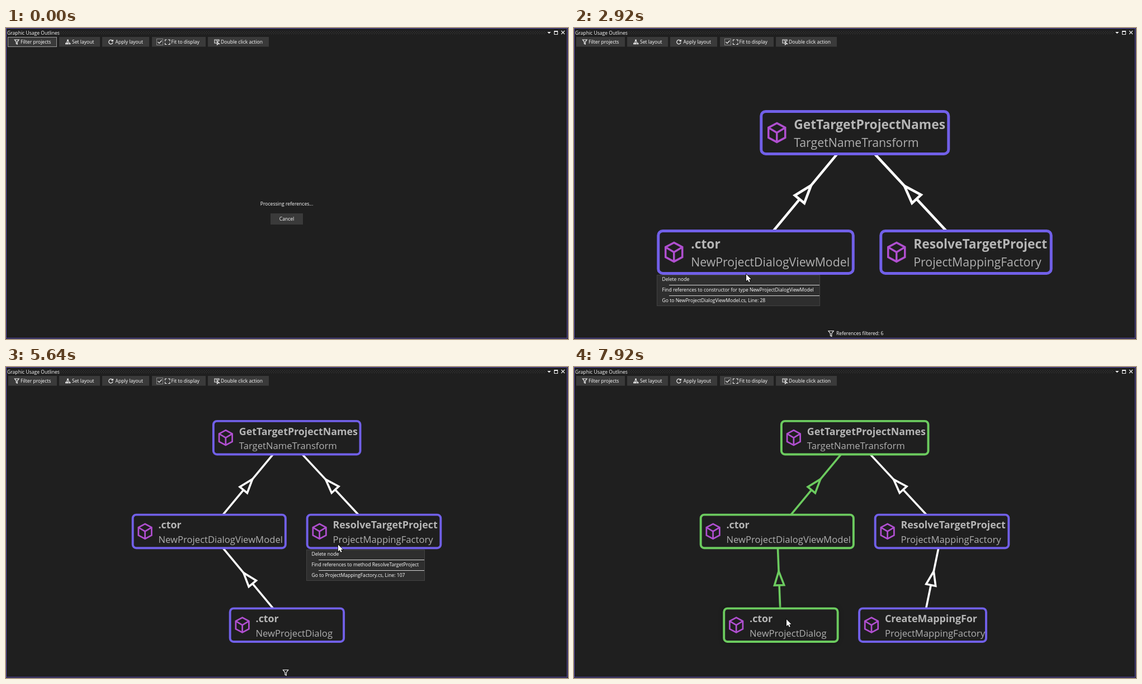
Animation, 1005 px wide and 557 px high, one loop 7.99 s. Source, as an HTML page with a canvas:

```html
<!DOCTYPE html>
<html lang="en">
<head>
<meta charset="utf-8">
<title>Reference graph</title>
<style>
html, body { margin: 0; width: 100%; height: 100%; overflow: hidden; background: #1f1f1f; }
canvas { display: block; }
</style>
</head>
<body>
<canvas id="stage" width="1005" height="557"></canvas>
<script>
const ctx = document.getElementById('stage').getContext('2d');
const LOOP = 7990, BG = '#1f1f1f', PURPLE = '#7160e8', GREEN = '#6ccb5f';
const FONT = '"Open Sans", "Noto Sans", sans-serif';
const NODE_H = 81, ROW = 214;

// Moments of the story, in ms
const T = { graph: 70, menu1: 2480, pick1: 3488, menu2: 5600, pick2: 5980, grow2: 6150 };

const lerp = (a, b, p) => a + (b - a) * p;
const clamp = v => Math.min(1, Math.max(0, v));
const ease = (t, start, length, power) => 1 - (1 - clamp((t - start) / length)) ** power;

// time, x, y
const cursorKeys = [
  [1040, 829, 72], [1810, 88, 416], [1880, 100, 415], [2410, 308, 400], [2850, 308, 400],
  [2920, 308, 441], [3060, 308, 452], [3250, 308, 461], [3510, 308, 461], [4260, 303, 465],
  [5090, 276, 440], [5560, 594, 318], [5640, 594, 318], [5860, 575, 355],
  [7290, 575, 355], [7800, 380, 452]
];

function cursorAt(t) {
  if (t < cursorKeys[0][0]) return null;
  const i = cursorKeys.findIndex(k => k[0] > t);
  if (i < 0) return cursorKeys.at(-1).slice(1);
  const [t0, x0, y0] = cursorKeys[i - 1], [t1, x1, y1] = cursorKeys[i];
  const p = (t - t0) / (t1 - t0);
  return [lerp(x0, x1, p), lerp(y0, y1, p)];
}

function text(str, x, y, size = 8.6, color = '#fff', weight = 400, align = 'left') {
  ctx.font = `${weight} ${size}px ${FONT}`;
  ctx.textAlign = align;
  ctx.fillStyle = color;
  ctx.fillText(str, x, y);
}

function rect(x, y, w, h, color) {
  ctx.fillStyle = color;
  ctx.fillRect(x, y, w, h);
}

function frame(x, y, w, h, color) {
  ctx.strokeStyle = color;
  ctx.lineWidth = 1;
  ctx.strokeRect(x + .5, y + .5, w - 1, h - 1);
}

function line(path, color = '#f0f0f0', width = 1, x = 0, y = 0) {
  ctx.save();
  ctx.translate(x, y);
  ctx.strokeStyle = color;
  ctx.lineWidth = width;
  ctx.stroke(new Path2D(path));
  ctx.restore();
}

function funnel(x, y, s) {
  line(`M0 0H${8 * s}L${5 * s} ${4 * s}V${8.5 * s}L${3 * s} ${7.5 * s}V${4 * s}Z`, '#f0f0f0', 1.2, x, y);
}

function drawToolbar(focused) {
  const buttons = [
    ['Filter projects', 4, 87, 26], ['Set layout', 95, 73, 118], ['Apply layout', 172, 84, 195.5],
    ['Fit to display', 261, 96, 295.5], ['Double click action', 361, 109, 384]
  ];
  for (const [label, x, w, tx] of buttons) {
    rect(x, 16, w, 17.5, '#3a3a3a');
    text(label, tx, 28);
  }
  if (focused) frame(3, 16, 88, 18, '#999');

  funnel(15.5, 21, .95);
  line('M4 2L1.5 7M5 2L7.5 7M4.5 4V7', '#f0f0f0', 1, 106, 20.5);
  for (const [x, y] of [[110.5, 22], [107.5, 28], [110.5, 28], [114, 28]]) rect(x - 1.3, y - 1.3, 2.6, 2.6, '#f0f0f0');
  line('M7.5 2.5A3.7 3.7 0 1 0 8 5.5M8.3 .5V3.2H5.5', '#f0f0f0', 1.2, 183, 20.5);
  frame(269, 19, 12, 12, '#858585');
  line('M2.5 6L5 8.5L9.5 3.5', '#f0f0f0', 1.2, 269, 19);
  line('M0 3V0H3M5.5 0H8.5V3M8.5 5.5V8.5H5.5M3 8.5H0V5.5', '#f0f0f0', 1.1, 284.5, 21);
  line('M4 6H0V0H8V3M2 2H6V4M4.5 4V9L6 7.5H8.5Z', '#f0f0f0', 1.1, 373, 21);
}

function drawWindow(focused) {
  rect(0, 0, 1005, 557, BG);
  text('Graphic Usage Outlines', 2, 11.5);
  ctx.fillStyle = '#484848';
  for (let x = 94; x < 963; x += 4) {
    ctx.fillRect(x, 6, 1, 1);
    ctx.fillRect(x + 2, 8, 1, 1);
    ctx.fillRect(x, 10, 1, 1);
  }
  ctx.fillStyle = '#f0f0f0';
  ctx.fill(new Path2D('M968 7H974.5L971.2 10.2Z'));
  frame(980, 5, 7, 7, '#f0f0f0');
  rect(980, 5, 7, 2, '#f0f0f0');
  line('M993 5L999 11M999 5L993 11', '#f0f0f0', 1.2);
  drawToolbar(focused);
  frame(0, 0, 1004, 556, '#5c4fb5');
}

// Nodes in world units: x is relative to the middle of the root
function layout(t) {
  const first = ease(t, T.graph, 700, 2.15);
  const second = ease(t, T.pick1, 840, 1.27);
  const third = ease(t, T.grow2, 840, 1.27);
  const node = (title, type, w, x, y, parent) => ({ title, type, w, x, y, parent });

  const root = node('GetTargetProjectNames', 'TargetNameTransform', 340, -170, 0);
  const model = node('.ctor', 'NewProjectDialogViewModel', 353.5, lerp(-170, -354, first), ROW * first, root);
  const resolve = node('ResolveTargetProject', 'ProjectMappingFactory', 309.5, lerp(-170, 44, first), ROW * first, root);
  const nodes = [root, model, resolve];
  if (t >= T.pick1) {
    const x = lerp(lerp(-354, -132, second), -301, third);
    nodes.push(node('.ctor', 'NewProjectDialog', 264.5, x, ROW * (1 + second), model));
  }
  if (t >= T.grow2) {
    nodes.push(node('CreateMappingFor', 'ProjectMappingFactory', 294.5, lerp(44, 7.5, third), ROW * (1 + third), resolve));
  }
  return { nodes, rest: 1 - first };
}

// Fit the bounds of all nodes to the view; rest is the part of the opening still to run
function fitView({ nodes, rest }) {
  const left = Math.min(...nodes.map(n => n.x)), right = Math.max(...nodes.map(n => n.x + n.w));
  const bottom = Math.max(...nodes.map(n => n.y)) + NODE_H;
  const s = Math.min(707.5 / (right - left), 399 / bottom) * (1 - .32 * Math.sqrt(rest));
  return {
    s,
    x: 502 + 39.5 * Math.sqrt(rest) - s * (left + right) / 2,
    y: 294.4 - 175 * rest ** .8 - s * bottom / 2
  };
}

function drawEdge(child, color) {
  const p = child.parent;
  const ax = child.x + child.w / 2, ay = child.y + NODE_H / 2;
  const bx = p.x + p.w / 2, by = p.y + NODE_H / 2;
  if (ay - by < 1) return;
  const midY = (p.y + NODE_H + child.y) / 2;
  const midX = lerp(bx, ax, (midY - by) / (ay - by));
  ctx.strokeStyle = color;
  ctx.lineWidth = 4.6;
  ctx.beginPath();
  ctx.moveTo(ax, ay);
  ctx.lineTo(bx, by);
  ctx.stroke();

  ctx.save();
  ctx.translate(midX, midY);
  ctx.rotate(Math.atan2(by - ay, bx - ax));
  ctx.fillStyle = BG;
  const head = new Path2D('M16 0L-16 -11V11Z');
  ctx.fill(head);
  ctx.stroke(head);
  ctx.restore();
}

function drawNode(n, color, hovered) {
  ctx.save();
  ctx.translate(n.x, n.y);
  ctx.beginPath();
  ctx.roundRect(2.5, 2.5, n.w - 5, NODE_H - 5, 8);
  ctx.fillStyle = BG;
  if (hovered) {
    ctx.shadowColor = 'rgba(0,0,0,.6)';
    ctx.shadowBlur = 9;
  }
  ctx.fill();
  ctx.shadowBlur = 0;
  ctx.strokeStyle = color;
  ctx.lineWidth = 5;
  ctx.stroke();
  line('M0 -17L15 -9V9L0 17L-15 9V-9ZM-15 -9L0 0L15 -9M0 0V17', '#b04fd0', 3.5, 30.5, 40.5);
  text(n.title, 61, 34, 22.75, '#b6b6b6', 700);
  text(n.type, 61, 66.5, 21.25, '#b0b0b0');
  ctx.restore();
}

function drawGraph(nodes, view, pointer) {
  let hovered;
  if (pointer) {
    const x = (pointer[0] - view.x) / view.s, y = (pointer[1] - view.y) / view.s;
    hovered = nodes.findLast(n => x > n.x && x < n.x + n.w && y > n.y && y < n.y + NODE_H);
  }
  const chain = new Set();
  for (let n = hovered; n; n = n.parent) chain.add(n);

  ctx.save();
  ctx.translate(view.x, view.y);
  ctx.scale(view.s, view.s);
  for (const n of nodes) if (n.parent) drawEdge(n, chain.has(n) ? GREEN : '#fff');
  for (const n of nodes) drawNode(n, chain.has(n) ? GREEN : PURPLE, n === hovered);
  ctx.restore();
}

function drawMenu(x, y, w, items, pointer) {
  rect(x, y, w, 56, '#2e2e2e');
  if (pointer[1] > y + 17 && pointer[1] < y + 36) rect(x + 1, y + 18, w - 2, 18, '#3d3d3d');
  frame(x, y, w, 56, '#424242');
  items.forEach((item, i) => text(item, x + 9.5, y + 10.5 + 19.2 * i));
  for (const dy of [18, 37]) rect(x + 22, y + dy, w - 23, 1, '#d8d8d8');
}

function drawStatus(t) {
  if (t < T.pick1) {
    funnel(455, 542.5, 1.15);
    text('References filtered: 6', 469, 550);
  } else if (t < T.pick2) {
    funnel(495.5, 542.5, 1.15);
  }
}

function drawCursor([x, y]) {
  const arrow = new Path2D('M0 0V12.2L2.8 9.6L4.8 13.8L6.8 12.9L4.9 8.8H8.7Z');
  ctx.save();
  ctx.translate(x, y);
  ctx.lineWidth = 1.4;
  ctx.strokeStyle = '#000';
  ctx.stroke(arrow);
  ctx.fillStyle = '#fff';
  ctx.fill(arrow);
  ctx.restore();
}

function draw(t) {
  drawWindow(t < T.menu1);
  if (t < T.graph) {
    text('Processing references...', 502, 317.5, 8.6, '#fff', 400, 'center');
    rect(473, 332, 58, 20, '#3a3a3a');
    text('Cancel', 502, 345, 8.6, '#fff', 400, 'center');
    return;
  }
  const scene = layout(t), pointer = cursorAt(t);
  const menu1 = t >= T.menu1 && t < T.pick1, menu2 = t >= T.menu2 && t < T.pick2;
  drawGraph(scene.nodes, fitView(scene), menu1 || menu2 ? null : pointer);
  drawStatus(t);
  if (menu1) {
    drawMenu(148, 442, 292, ['Delete node',
      'Find references to constructor for type NewProjectDialogViewModel',
      'Go to NewProjectDialogViewModel.cs, Line: 28'], pointer);
  }
  if (menu2) {
    drawMenu(537, 327, 212, ['Delete node',
      'Find references to method ResolveTargetProject',
      'Go to ProjectMappingFactory.cs, Line: 107'], pointer);
  }
  if (pointer) drawCursor(pointer);
}

const begin = performance.now();
function tick() {
  draw((performance.now() - begin) % LOOP);
  requestAnimationFrame(tick);
}
tick();
</script>
</body>
</html>
```
